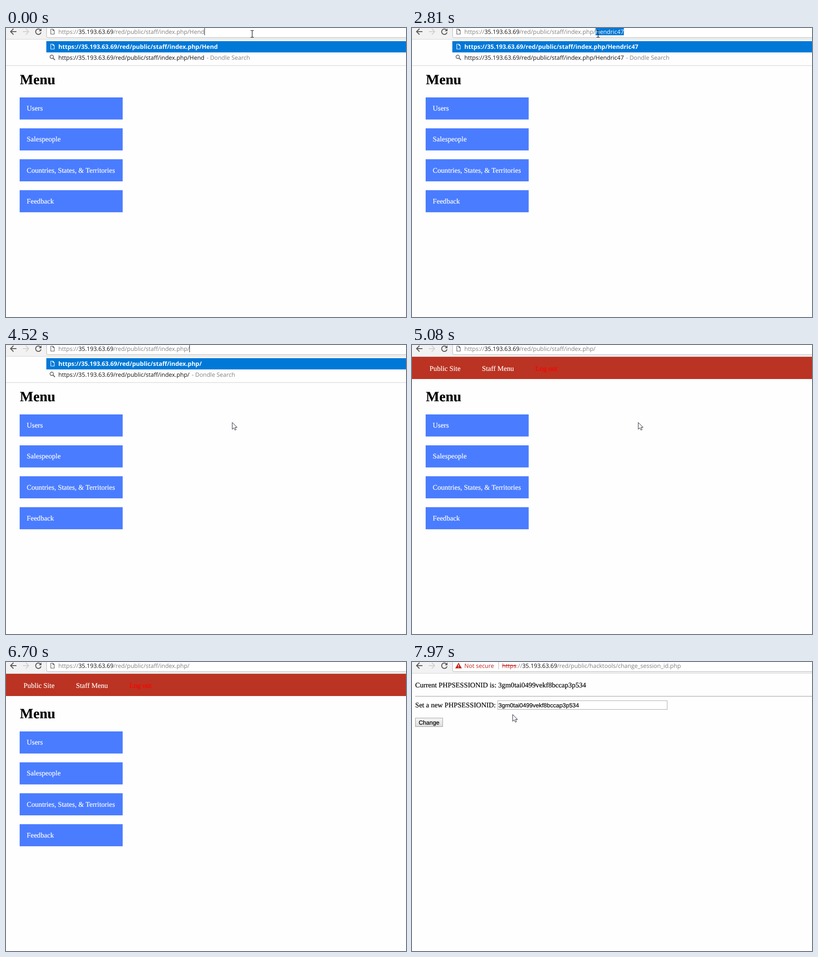
An HTML page for the animation above (8000 ms loop, 879 by 637 pixels).

```html
<!DOCTYPE html>
<html lang="en">
<head>
<meta charset="utf-8">
<title>Session walkthrough</title>
<style>
  html, body { margin: 0; width: 100%; height: 100%; overflow: hidden; background: #fefefe; }
  svg { display: block; width: 100vw; height: 100vh; }
  text { white-space: pre; text-rendering: geometricPrecision; }
  .ui { font: 12.95px "Open Sans", "Noto Sans", sans-serif; }
  .ui .bold { font-size: 13.25px; font-weight: 700; }
  .page { font: 15.6px "Liberation Serif", "Times New Roman", serif; color: #000; }
  .page text { fill: currentColor; stroke: currentColor; stroke-width: .2; }
  .light { color: #fff; }
  .alert { color: #f00; }
  .form { font: 13px "Liberation Sans", Arial, sans-serif; }
  .dim { fill: #808080; }
  .host { fill: #111; }
  .warn { fill: #c5221f; }
  .line { fill: none; stroke: #5a5a5a; }
</style>
</head>
<body>
<svg viewBox="0 0 879 637">
  <defs>
    <path id="sheet" d="M.5 .5H5L8 3.5V11.5H.5ZM5 .5V3.5H8" fill="none" stroke-width="1.2"/>
    <linearGradient id="face" x2="0" y2="1">
      <stop stop-color="#f6f6f6"/><stop offset="1" stop-color="#dcdcdc"/>
    </linearGradient>
  </defs>
  <rect width="879" height="637" fill="#fefefe"/>

  <g id="menuPage" class="page">
    <rect y="26" width="879" height="49" fill="#bb3322"/>
    <g class="light">
      <text x="38.6" y="56.5">Public Site</text>
      <text x="153.8" y="56.5">Staff Menu</text>
      <text x="271" y="56.5" class="alert">Log out</text>
    </g>
    <text x="30.5" y="124" font-size="31.2" font-weight="700">Menu</text>
    <g id="buttons" class="light"></g>
  </g>

  <g id="formPage" class="page">
    <text x="7" y="55.5">Current PHPSESSIONID is: 3gm0tai0499vekf8bccap3p534</text>
    <path d="M7 75.5H879" stroke="#9a9a9a"/>
    <text x="7" y="99.5">Set a new PHPSESSIONID:</text>
    <rect x="188.5" y="85.2" width="372.3" height="19.4" fill="#fff" stroke="#a6a6a6"/>
    <rect x="7.5" y="123.5" width="60" height="19" fill="url(#face)" stroke="#a0a0a0"/>
    <g class="form">
      <text x="190" y="99.5">3gm0tai0499vekf8bccap3p534</text>
      <text x="14.7" y="137.5">Change</text>
    </g>
  </g>

  <g id="toolbar">
    <rect width="879" height="25" fill="#f2f2f2"/>
    <path d="M0 25H879" stroke="#d4d4d4"/>
    <path d="M89.2 -4V18.2Q89.2 21.2 92.2 21.2H884V-4Z" fill="#fff" stroke="#b2b2b2"/>
    <path class="line" stroke-width="2" d="M23 8H10.5M16.5 1.5L10 8L16.5 14.5"/>
    <path class="line" stroke-width="2" style="stroke:#d2d2d2" d="M37 8H49.5M43.5 1.5L50 8L43.5 14.5"/>
    <path class="line" stroke-width="2" d="M75.5 4A6 6 0 1 0 77 9.5"/>
    <path d="M78 1V7H72Z" fill="#5a5a5a"/>
  </g>

  <g id="staffUrl" class="ui">
    <use href="#sheet" x="98" y="2" stroke="#5a5a5a"/>
    <rect id="selection" height="16" fill="#0078d7"/>
    <text id="url" x="115" y="12.8" class="dim">https://<tspan class="host">35.193.63.69</tspan>/red/public/staff/index.php/<tspan id="plain"></tspan><tspan id="marked" fill="#fff"></tspan></text>
    <rect id="caret" width="1" height="16" fill="#222"/>
  </g>

  <g id="toolUrl" class="ui">
    <path d="M102.3 1.5L109.5 14H95Z" fill="#c5221f"/>
    <path d="M102.3 5.5V10M102.3 11.2V12.7" stroke="#fff" stroke-width="1.4"/>
    <text x="115" y="12.8" class="warn">Not secure</text>
    <path d="M190.5 0V16" stroke="#b4b4b4"/>
    <text x="198" y="12.8" class="dim"><tspan class="warn" text-decoration="line-through">https</tspan>://<tspan class="host">35.193.63.69</tspan>/red/public/hacktools/change_session_id.php</text>
  </g>

  <g id="dropdown" class="ui">
    <rect y="26" width="879" height="57" fill="#fefefe"/>
    <path d="M0 82.5H879" stroke="#dcdcdc"/>
    <path d="M0 83.5H879" stroke="#f1f1f1"/>
    <rect x="88.6" y="29" width="791" height="24.8" fill="#0078d7"/>
    <use href="#sheet" x="98" y="35" stroke="#fff"/>
    <text x="115" y="45.8" class="bold" fill="#fff" id="firstRow"></text>
    <circle cx="100.5" cy="63.5" r="3.7" class="line" stroke-width="1.5"/>
    <path d="M103.2 66.2L107.5 70.5" class="line" stroke-width="1.8"/>
    <text x="115" y="70"><tspan id="secondRow" class="host"></tspan><tspan class="dim" dx="1.5"> - Dondle Search</tspan></text>
  </g>

  <path id="beam" d="M-3.5 -7.5H-1L0 -6.8L1 -7.5H3.5M0 -7V7M-3.5 7.5H-1L0 6.8L1 7.5H3.5" fill="none" stroke="#111" stroke-width="1.2"/>
  <path id="arrow" d="M.7 .7V15.8L4.2 12.5L6.7 17.6L9.2 16.5L6.8 11.6H11.3Z" fill="#fff" stroke="#1a1a2a"/>
</svg>

<script>
const LOOP = 8000;
const BASE = "https://35.193.63.69/red/public/staff/index.php/";
const NAME = "Hendric47";
const el = Object.fromEntries([...document.querySelectorAll("[id]")].map(n => [n.id, n]));

["Users", "Salespeople", "Countries, States, & Territories", "Feedback"].forEach((label, i) => {
  const add = (tag, attrs) => {
    const node = document.createElementNS("http://www.w3.org/2000/svg", tag);
    for (const key in attrs) node.setAttribute(key, attrs[key]);
    return el.buttons.appendChild(node);
  };
  const y = 153 + i * 68.15;
  add("rect", { x: 30, y, width: 226.4, height: 48.7, fill: "#4a7cff" });
  add("text", { x: 45.6, y: y + 29.3 }).textContent = label;
});

// Each step changes part of the state; "from" is the first selected letter.
const steps = [
  [0, { typed: 4, from: 9, caret: 1, open: 1, form: 0, arrow: null, beam: [541, 13] }],
  [300, { typed: 5 }],
  [420, { typed: 7 }],
  [980, { caret: 0 }],
  [1250, { typed: 8, caret: 1 }],
  [1380, { typed: 9 }],
  [2120, { beam: [503, 13] }],
  [2260, { beam: [466, 13] }],
  [2380, { beam: [418.5, 13], from: 1, caret: 0 }],
  [2660, { beam: [414, 13] }],
  [2810, { beam: [409, 13], from: 0 }],
  [2960, { beam: [411, 15] }],
  [3080, { beam: [415, 22] }],
  [3230, { beam: null, arrow: [440, 110] }],
  [3350, { arrow: [472, 193] }],
  [3500, { arrow: [473, 193] }],
  [3650, { arrow: [482, 163] }],
  [3810, { arrow: [496.5, 170] }],
  [4520, { typed: 0, from: 9, caret: 1 }],
  [5080, { open: 0, caret: 0 }],
  [5390, { arrow: [482, 53] }],
  [5540, { arrow: [223, 41] }],
  [5670, { arrow: [330, 178] }],
  [5820, { arrow: [400, 130] }],
  [5940, { arrow: [330, 54] }],
  [6070, { arrow: [218, 100] }],
  [6190, { arrow: [433, 177] }],
  [6330, { arrow: [700, 110] }],
  [6450, { arrow: [834, 56] }],
  [6700, { arrow: null }],
  [7420, { form: 1 }],
  [7540, { arrow: [665, 192] }],
  [7690, { arrow: [587, 185] }],
  [7840, { arrow: [380, 150] }],
  [7970, { arrow: [220.5, 115] }]
];

const show = (node, on) => { node.style.display = on ? "" : "none"; };
const place = (node, at) => {
  show(node, at);
  if (at) node.setAttribute("transform", `translate(${at})`);
};

function draw(s) {
  const word = NAME.slice(0, s.typed);
  for (const id of ["formPage", "toolUrl"]) show(el[id], s.form);
  for (const id of ["menuPage", "staffUrl"]) show(el[id], !s.form);
  show(el.dropdown, s.open);
  place(el.beam, s.beam);
  place(el.arrow, s.arrow);
  show(el.caret, s.caret);
  show(el.selection, s.from < s.typed);
  if (s.form) return;

  el.plain.textContent = word.slice(0, s.from);
  el.marked.textContent = word.slice(s.from);
  el.firstRow.textContent = el.secondRow.textContent = BASE + word;
  const end = 115 + el.url.getComputedTextLength();
  el.caret.setAttribute("x", Math.round(end));
  if (s.from < s.typed) {
    const start = el.url.getStartPositionOfChar(BASE.length + s.from).x;
    el.selection.setAttribute("x", start);
    el.selection.setAttribute("width", end - start);
  }
}

let last = -1;
function tick() {
  const t = performance.now() % LOOP;
  const past = steps.filter(([at]) => at <= t);
  if (past.length !== last) {
    last = past.length;
    draw(Object.assign({}, ...past.map(([, change]) => change)));
  }
  requestAnimationFrame(tick);
}
tick();
</script>
</body>
</html>
```
